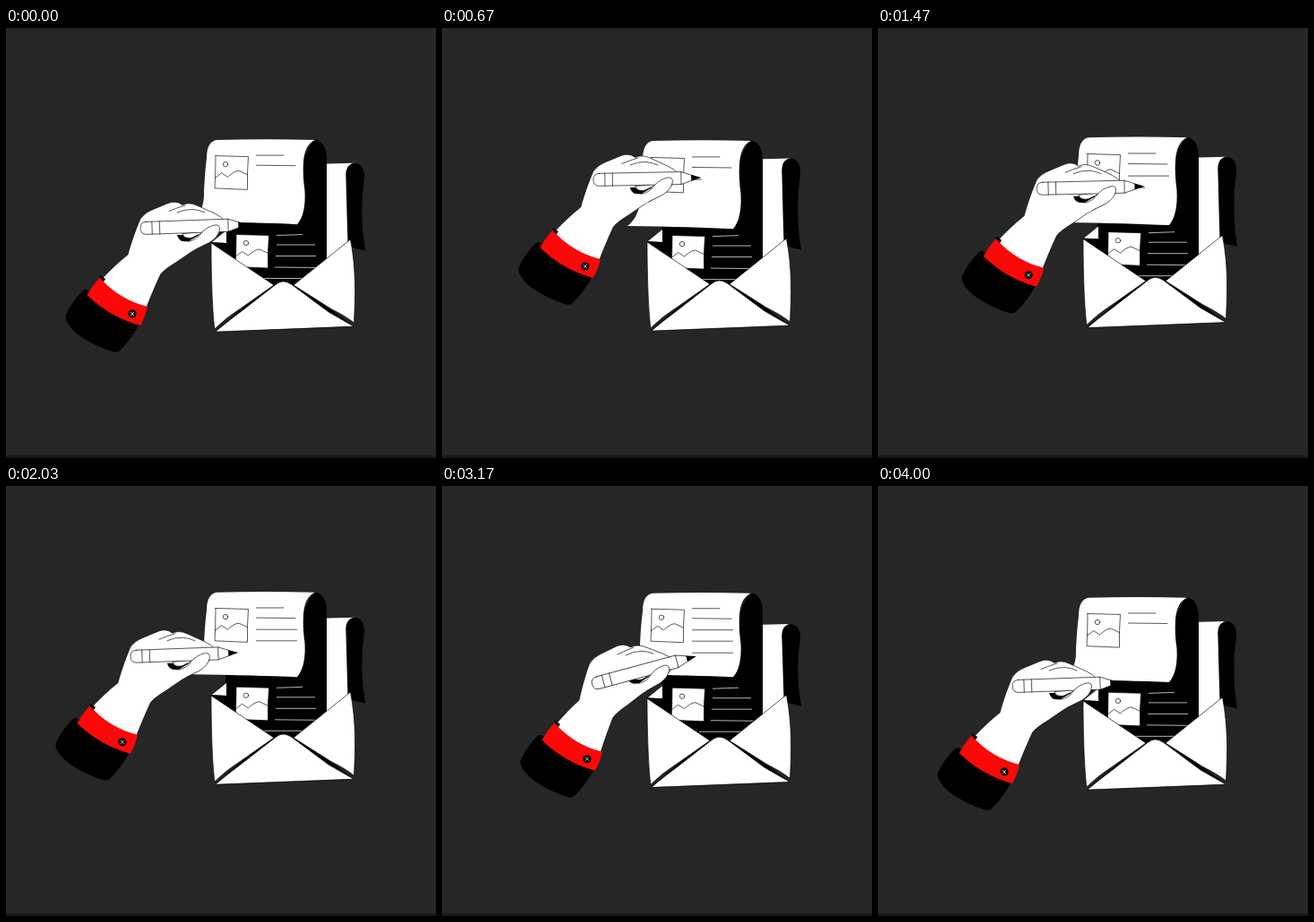
These frames come from a looping animation (480x480 px, 4030 ms). An HTML page:

```html
<!DOCTYPE html>
<html lang="en">
<head>
<meta charset="utf-8">
<title>Writing a letter</title>
<style>
html, body { margin: 0; height: 100%; overflow: hidden; background: #262626; }
svg { display: block; width: 100vw; height: 100vh; }
.w { fill: #fff; }
.ink { fill: none; stroke: #000; stroke-width: .65; stroke-linecap: round; stroke-linejoin: round; }
.w.ink { fill: #fff; }
.chalk { fill: none; stroke: #fff; stroke-width: .7; }
</style>
</head>
<body>
<svg viewBox="0 0 480 480">
  <defs>
    <g id="pic">
      <path class="w ink" d="M234 142.500L270.500 143.500Q269 162 269.500 180L233 178.500Q234 160 234 142.500Z"/>
      <circle class="ink" cx="245" cy="152" r="2.700"/>
      <path class="ink" d="M233.500 167L240.500 161.500L247.500 166Q255 159 260 159L269.500 163.500"/>
    </g>
  </defs>
  <rect y="477" width="480" height="3" fill="#21161b"/>

  <path id="backSheet" class="w"/>
  <path id="backRoll"/>

  <g id="inside">
    <path d="M343 124.500Q358 125 358 148V292H245V205L330 150Z"/>
    <use href="#pic" x="23" y="88"/>
    <path class="chalk" d="M302 231.500L331 230.500M302 242H345M301 254.500H346M300 267L347 267.500M287 279.500H345"/>
  </g>

  <g id="envelope">
    <path class="w" d="M230 239L246 226V240Z"/>
    <path d="M229 239.500L246 240V256Z"/>
    <path d="M234 338L298 284H322L388 333Z"/>
    <path class="w ink" d="M229 240L299 287L262 313Q246 323 233 336C230 315 229 270 229 240Z"/>
    <path class="w ink" d="M384.500 236L321 287L362 313Q378 321 388.500 329C390 300 391 270 384.500 236Z"/>
    <path class="w ink" d="M234 339Q243 331 263 316L301 286.500Q309 279.500 319 286.500L360 317L388 333Z"/>
  </g>

  <g id="page">
    <path class="w" d="M235 125Q290 123.500 345 125Q333 130 332 150Q331 164 333.500 181Q335 207 325 218.500Q280 216.500 207 215.500Q222 204 221 182Q222 160 224 145Q224 127 235 125Z"/>
    <use href="#pic"/>
    <path class="ink" d="M279.500 142H310M279.500 153L323 153.500"/>
    <g id="lines" class="ink"></g>
  </g>

  <g id="arm">
    <g id="hand">
      <path class="w ink" d="M106 281Q122 264 136 253C140 238 146 222 150 213Q155 206 163 203L181 195.500Q190 192 197 197.500Q204 194 213 198L233 207Q241 211 244 215L240 226L228 238L209 248.500L190 261.500Q176 270 172.500 275Q165 291 156 314Q130 308 106 281Z"/>
      <path class="ink" d="M182 204.500Q190 201 200 198M191 206Q200 202 209 202.500Q215 203 222 206"/>
      <path d="M191 231Q193 240 204 238L216 231Z"/>
      <path class="w ink" d="M197 230Q199 236 208 234L222 227Z"/>
      <g id="pencil">
        <path class="w ink" d="M157 214H248L260 218L260 224L248 228H157Q150 228 150 221T157 214Z"/>
        <path class="ink" d="M163 214V228M171.500 214V228M248 214V228"/>
        <path d="M259.500 217.500L270.500 221L259.500 224.500Z"/>
      </g>
      <path class="w" d="M198 240Q213 237 218 229Q224 222 233 220Q239 219 238.500 225Q237 233 228 239L205 250Z"/>
      <path class="ink" d="M203 238.500Q213 237 218 229Q224 222 233 220Q239 219 238.500 225Q237 233 228 239L212 247"/>
    </g>
    <path d="M104 281L105 276L111 280L108 285ZM90 292L86 293Q73 306 66.500 321Q66 330 80 342Q98 355 121 362Q126 362 128 359Q140 347 148 332L119 318Z"/>
    <path d="M104.500 278.500Q96 288 90.500 298Q116 323 150 332Q156 321 158 311Q126 303 104.500 278.500Z" fill="#fb0808"/>
    <circle cx="141" cy="319" r="4.600"/>
    <path d="M139 317L143 321M143 317L139 321" stroke="#fff" stroke-width=".8"/>
  </g>
</svg>
<script>
const LOOP = 4030;
const $ = id => document.getElementById(id);
const wave = (t, peak) => Math.cos(2 * Math.PI * (t - peak) / LOOP);
const clamp = v => Math.min(1, Math.max(0, v));
const smooth = u => u * u * (3 - 2 * u);
const place = (id, transform) => $(id).setAttribute('transform', transform);

// time, x and y of the writing arm relative to its resting place
const path = [
  [0, 0, 0], [130, 0, 0], [570, 9, -53], [900, 53, -53], [1280, 9, -44.5],
  [1720, 54, -41.5], [2200, -37, -30], [2783, 54, -37], [2820, 54, -37],
  [3430, 0, 0], [LOOP, 0, 0]
];
// start, end and height of each handwritten line
const strokes = [[570, 900, 166], [1280, 1720, 178.5], [2490, 2783, 191.5]];
const lines = strokes.map(() => $('lines').appendChild(
  document.createElementNS('http://www.w3.org/2000/svg', 'path')));

function armAt(t) {
  const i = path.findIndex(k => k[0] > t);
  const a = path[i - 1], b = path[i];
  const s = smooth((t - a[0]) / (b[0] - a[0]));
  return [a[1] + (b[1] - a[1]) * s, a[2] + (b[2] - a[2]) * s];
}

function draw(t) {
  const envY = 3 * wave(t, 100) - 3;
  const sheetY = 4.3 * wave(t, 500) - 3.05;
  const stretch = 1 + .065 * ((1 + wave(t, 1050)) / 2) ** 3;
  place('envelope', `translate(0 ${envY})`);
  place('inside', `translate(0 ${sheetY})`);
  place('page', `translate(0 ${sheetY + 125 * (1 - stretch)}) scale(1 ${stretch})`);

  const top = 148.7 + 5.3 * wave(t, 3270), low = 248.5 + envY;
  $('backSheet').setAttribute('d',
    `M350 ${top + 1}L389 ${top}L381 ${low}L350 ${low + 20}Z`);
  $('backRoll').setAttribute('d',
    `M388 ${top}Q400 ${top} 400 ${top + 16}Q394 ${low - 40} 401 ${low}L388 ${low - 3}` +
    `L381.5 ${low - 9}Q380.5 ${low - 40} 379.5 ${top + 18}Q378 ${top + 2} 388 ${top}Z`);

  const [x, y] = armAt(t);
  const lift = Math.sin(Math.PI * clamp((t - 2820) / 610));
  place('arm', `translate(${x} ${y})`);
  place('hand', `rotate(${-3.5 * lift} 141 319)`);
  place('pencil', `rotate(${-2 - wave(t, 3000) - 9 * lift} 225 221)`);

  strokes.forEach(([from, to, h], i) => {
    const part = t < from ? 0 : t > to ? 1 : clamp((x - 9) / 45);
    lines[i].setAttribute('d', part ? `M279.5 ${h}h${45 * part}` : '');
  });
  $('lines').setAttribute('opacity', 1 - clamp((t - 3300) / 300));
}

function tick() {
  draw(performance.now() % LOOP);
  requestAnimationFrame(tick);
}
tick();
</script>
</body>
</html>
```
